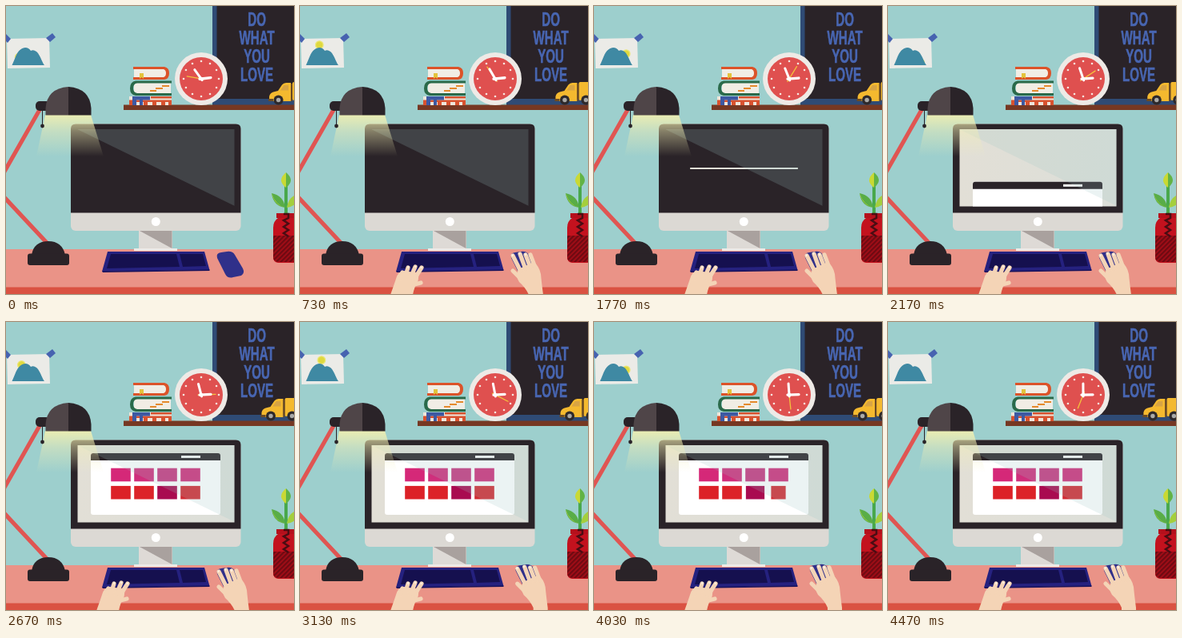
An HTML page that plays this animation: 360 px wide and 360 px high, repeating every 4510 ms.

```html
<!DOCTYPE html>
<html lang="en">
<head>
<meta charset="utf-8">
<title>Desk</title>
<style>
html, body { margin: 0; width: 100%; height: 100%; overflow: hidden; background: #9dcfcd; }
svg { display: block; width: 100%; height: 100%; }
text { font: bold 23.6px "Liberation Sans", Arial, sans-serif; text-anchor: middle; }
.skin { fill: #f4d4b6; }
.fingers { stroke: #f4d4b6; stroke-width: 5.2; stroke-linecap: round; fill: none; }
.nails { stroke: #fbeee0; stroke-width: 2.2; stroke-linecap: round; fill: none; }
</style>
</head>
<body>
<svg viewBox="0 0 360 360">
  <defs>
    <linearGradient id="beam" x2="0" y2="1">
      <stop offset="0" stop-color="#f8f2ae" stop-opacity=".85"/>
      <stop offset=".4" stop-color="#f3efb4" stop-opacity=".45"/>
      <stop offset="1" stop-color="#f3efb4" stop-opacity="0"/>
    </linearGradient>
    <linearGradient id="lit">
      <stop offset="0" stop-color="#e2dfd6"/>
      <stop offset="1" stop-color="#dcdfd9"/>
    </linearGradient>
    <pattern id="hatch" width="4" height="4" patternUnits="userSpaceOnUse" patternTransform="rotate(45)">
      <rect width="2.3" height="4" fill="#6f0a12"/>
    </pattern>
    <clipPath id="screen"><rect x="89.5" y="154" width="196" height="96.500"/></clipPath>
    <clipPath id="card"><rect x="3" y="42" width="50" height="31"/></clipPath>
  </defs>

  <rect width="360" height="360" fill="#9dcfcd"/>

  <!-- chalkboard -->
  <path d="M258 0H360V124H258Z" fill="#2f4b75"/>
  <path d="M263.500 0H360V116H263.500Z" fill="#2a2328"/>
  <g transform="translate(313.6 0) scale(.64 1)" fill="#4866b2" stroke="#4866b2" stroke-width=".6">
    <text y="25">DO</text><text y="48">WHAT</text><text y="71">YOU</text><text y="94">LOVE</text>
  </g>

  <!-- pinned picture -->
  <path d="M1 41 54 40 55 77 2 78Z" fill="#ebebe7"/>
  <g clip-path="url(#card)"><circle id="sun" r="4.8" fill="#dfd93f" stroke="#ebe677" stroke-width="1.3"/></g>
  <path d="M7.500 74C11 67 13 58 18 54.500C22 51 28 51 31 56C33 54.500 37 55 40 59C44 65 45 70 48 74Z" fill="#3f89a3"/>
  <path d="M0 35 6 41 2 46 0 44ZM50 40 58 34 62 39 55 45Z" fill="#4763b0"/>

  <!-- shelf -->
  <rect x="147" y="123.5" width="213" height="6.5" fill="#763823"/>
  <g id="truck">
    <rect x="29" y="95" width="45" height="23" rx="2" fill="#f4b92f"/>
    <path d="M0 118V113Q1 108 7 107L11 106 16 98.500Q18 96 21 96H27V119H0Z" fill="#f4b92f"/>
    <path d="M14 105.500 18.500 99H24V105.500Z" fill="#d8a443"/>
    <path d="M-1 116H5V119H-1ZM27 97H29V119H27Z" fill="#6b4a24"/>
    <g fill="#2d292b"><circle cx="11.500" cy="117.500" r="6"/><circle cx="38" cy="117.500" r="6"/></g>
    <g fill="#a9a9a7"><circle cx="11.500" cy="117.500" r="2.700"/><circle cx="38" cy="117.500" r="2.700"/></g>
  </g>

  <!-- books -->
  <path d="M160 79H200V89H160Z" fill="#f1ede5"/>
  <path d="M159 76H198Q204 77 204 84Q204 91 198 92H159V89H197Q200 88 200 84Q200 80 197 79H159Z" fill="#dc5329"/>
  <path d="M167 84H172V91L169.500 89 167 91Z" fill="#e3c33c"/>
  <path d="M160 96H206V109H160Z" fill="#f1ede5"/>
  <path d="M207 93.500H162Q155 94.500 155 103Q155 111 162 112H207V109H164Q159 108 159 103Q159 97 164 96.500H207Z" fill="#2a6a4a"/>
  <path d="M180 105H188V107H180ZM187 102H196V104H187ZM195 99H204V101H195Z" fill="#e58a2c"/>
  <path d="M154 113H207V124H154Z" fill="#efe6db"/>
  <path d="M154 117.500H207V124H203V120H199V124H194V120H188V124H183V120H177V124H172V120H158V124H154ZM181 113H207V115.500H181Z" fill="#d8522f"/>
  <path d="M158 113H180V117.500H158ZM158 117H163V124H158ZM167 117H171V124H167Z" fill="#3d59a3"/>

  <!-- clock -->
  <circle cx="244" cy="91" r="33" fill="#eeeae6"/>
  <circle cx="244" cy="91" r="27" fill="#df504f"/>
  <g id="ticks" fill="#f6e6df"></g>
  <g stroke-linecap="round" stroke="#fff">
    <path id="second" d="M0 4V-18" stroke="#f3c23c" stroke-width="1.300"/>
    <path id="hour" d="M0 2V-12" stroke-width="3.300"/>
    <path id="minute" d="M0 2V-14" stroke-width="3"/>
  </g>
  <circle cx="244" cy="91" r="2.200" fill="#fff"/>

  <!-- desk -->
  <rect y="304" width="360" height="48" fill="#ea9387"/>
  <rect y="351.500" width="360" height="8.500" fill="#da5242"/>

  <!-- monitor -->
  <path d="M166 280H208V304H166Z" fill="#dedad6"/>
  <path d="M167 281H207.500V303Z" fill="#a9a19e"/>
  <path d="M160 303H214V306H160Z" fill="#eeeae6"/>
  <rect x="81" y="147.500" width="212.500" height="133.500" rx="6" fill="#dcd9d4"/>
  <path d="M81 258.500V153.500Q81 147.500 87 147.500H287.500Q293.500 147.500 293.500 153.500V258.500Z" fill="#2a2328"/>
  <circle cx="187.300" cy="269.500" r="5.500" fill="#fff"/>
  <g clip-path="url(#screen)">
    <rect id="glow" fill="url(#lit)"/>
    <g id="win">
      <rect x="106" y="164" width="162" height="77" rx="3" fill="#fff"/>
      <path d="M106 173V167Q106 164 109 164H265Q268 164 268 167V173Z" fill="#2a2328"/>
      <rect x="219" y="167" width="24" height="3" fill="#f4f4f2"/>
      <g id="tiles"></g>
    </g>
    <path d="M89 154H286V250Z" fill="#9bc4c4" opacity=".2"/>
  </g>

  <!-- lamp -->
  <path d="M49 136H106L122 188H38Z" fill="url(#beam)"/>
  <path d="M43 128-6 214M-6 235 52 297" stroke="#e05552" stroke-width="5.200" fill="none"/>
  <path d="M45.500 130V149" stroke="#2a2328"/>
  <circle cx="45.500" cy="150" r="2.400" fill="#2a2328"/>
  <rect x="37" y="119" width="18" height="12" rx="5" fill="#2a2328"/>
  <path d="M49.500 136.500V128Q51 103 78 101V136.500Z" fill="#4f4548"/>
  <path d="M106.500 136.500V128Q105 103 78 101V136.500Z" fill="#2a2328"/>
  <path d="M32 311Q35 294 53 294Q70 294 74 311Z" fill="#2a2328"/>
  <rect x="27" y="309.500" width="52" height="14.500" rx="3" fill="#2a2328"/>

  <!-- plant -->
  <path d="M350 260V222" stroke="#48a84c" stroke-width="4"/>
  <path d="M350 208Q338 218 350 227Z" fill="#c9d934"/>
  <path d="M350 208Q362 218 350 227Z" fill="#62b345"/>
  <path d="M349 252Q334 250 332 234Q347 237 349 252Z" fill="#59ad47"/>
  <path d="M349 252Q337 249 332 234Q336 249 349 252Z" fill="#c9d934"/>
  <path d="M351 252Q353 237 368 234Q366 250 351 252Z" fill="#a5cf3d"/>
  <path d="M338 259H362V265H338Z" fill="#b5101c"/>
  <path d="M340 265H362V321H340Q334 320 334 314V277Q334 269 340 265Z" fill="#c3121e"/>
  <path d="M334 287H362V320H340Q334 319 334 314Z" fill="#a50d17"/>
  <path d="M334 287H362V320H340Q334 319 334 314Z" fill="url(#hatch)"/>
  <path d="M347 260H353V265L347 268 353 272 347 276 353 280 347 284 353 288" fill="none" stroke="#4a0d13" stroke-width="2.500"/>

  <!-- keyboard, mouse and hands -->
  <path d="M127 307H248L254.500 330 120 332Z" fill="#25217f"/>
  <path d="M131 310H213L217 326 126 328ZM217 310H246L250 325 221 326Z" fill="#15104f"/>
  <path d="M120 331.500 254.500 329.500V331L121 333Z" fill="#171159"/>
  <g id="mouse">
    <path d="M269 308Q262 309 264 315L274 335Q277 341 284 339L294 337Q299 334 296 328L286 311Q283 306 276 307Z" fill="#30308a"/>
  </g>
  <g id="left">
    <path class="skin" d="M120 341Q122 332 130 331L148 334Q149 342 146 347Q143 351 141 361V380H113V361Q117 350 120 341Z"/>
    <path class="fingers" d="M124 341 128 333M131 340 135 327M138 340 144 326M143 341 152 327M143 348 151 346"/>
    <path class="nails" d="M135 327 135.500 326M144 326 144.500 325.500M151.500 327 152 326.500"/>
  </g>
  <g id="right">
    <path class="skin" d="M273 329 292 320Q299 325 301 335Q302 346 304 361V380H286V361Q282 352 274 345Q269 338 273 329Z"/>
    <path class="fingers" d="M276 332 266 312M282 329 275 310M288 327 282 311M294 327 288 311M277 342 266 331"/>
    <path class="nails" d="M265.700 312 265.500 311M274.500 310 274.300 309M282 311 281.600 310"/>
  </g>
</svg>
<script>
const LOOP = 4510;
const $ = id => document.getElementById(id);
const set = (el, attrs) => { for (const k in attrs) el.setAttribute(k, attrs[k]); };
const add = (parent, tag, attrs) => {
  const el = document.createElementNS("http://www.w3.org/2000/svg", tag);
  set(el, attrs);
  return parent.appendChild(el);
};
const ramp = (t, a, b) => Math.min(1, Math.max(0, (t - a) / (b - a)));
const out = p => 1 - (1 - p) ** 3;
const smooth = p => p * p * (3 - 2 * p);
const move = (id, x, y) => set($(id), { transform: `translate(${x} ${y})` });
const turn = (id, deg) => set($(id), { transform: `translate(244 91) rotate(${deg})` });

for (let i = 0; i < 12; i++) {
  const a = i * Math.PI / 6;
  add($("ticks"), "circle", { cx: 244 + 22 * Math.sin(a), cy: 91 - 22 * Math.cos(a), r: 1.3 });
}

const colors = ["#d52878", "#cf2f7c", "#c7377f", "#cf2e7b", "#dc2127", "#dc2329", "#a90b50", "#d22a32"];
const tiles = colors.map((fill, i) => {
  const g = add($("tiles"), "g", {});
  add(g, "rect", { x: -12.3, y: -8.3, width: 24.6, height: 16.6, fill });
  return { g, x: 143.5 + 29 * (i % 4), y: i < 4 ? 191 : 213.2 };
});

function draw(t) {
  move("truck", 324.6 + 5.2 * Math.cos(2 * Math.PI * (t - 1690) / 1850), 0);

  turn("hour", 83 + 6 * t / LOOP);
  turn("minute", -36 + 36 * t / LOOP);
  turn("second", 280 + 0.063 * t);

  // two short days per loop
  const a = (-82.5 + 0.0856 * (t % (LOOP / 2))) * Math.PI / 180;
  set($("sun"), { cx: 28.5 + 12.5 * Math.sin(a), cy: 66.5 - 19 * Math.cos(a) });

  const rise = 62 * (1 - out(ramp(t, 20, 600)));
  const slide = smooth(ramp(t, 2700, 3200));
  move("left", 0, rise);
  move("right", 6 * slide, rise - 4 * slide);
  move("mouse", 6 * slide, -4 * slide);

  // screen wakes: a line widens, then opens vertically
  const w = 197 * ramp(t, 1600, 1850);
  const open = smooth(ramp(t, 1850, 2080));
  const top = 202 - 48 * open, bottom = 204 + 47 * open;
  set($("glow"), { x: 187.5 - w / 2, y: top, width: w, height: w ? bottom - top : 0 });

  move("win", 0, 88 * (1 - smooth(ramp(t, 2040, 2360))));
  tiles.forEach(({ g, x, y }, i) => {
    const grow = out(ramp(t, 2350 + i * 20, 2500 + i * 20));
    const flip = Math.abs(Math.cos(Math.PI * ramp(t, 3255 + i * 60, 3720 + i * 60)));
    set(g, { transform: `translate(${x} ${y}) scale(${grow * flip} ${grow})` });
  });
}

const start = performance.now();
function tick() {
  draw((performance.now() - start) % LOOP);
  requestAnimationFrame(tick);
}
draw(0);
requestAnimationFrame(tick);
</script>
</body>
</html>
```
